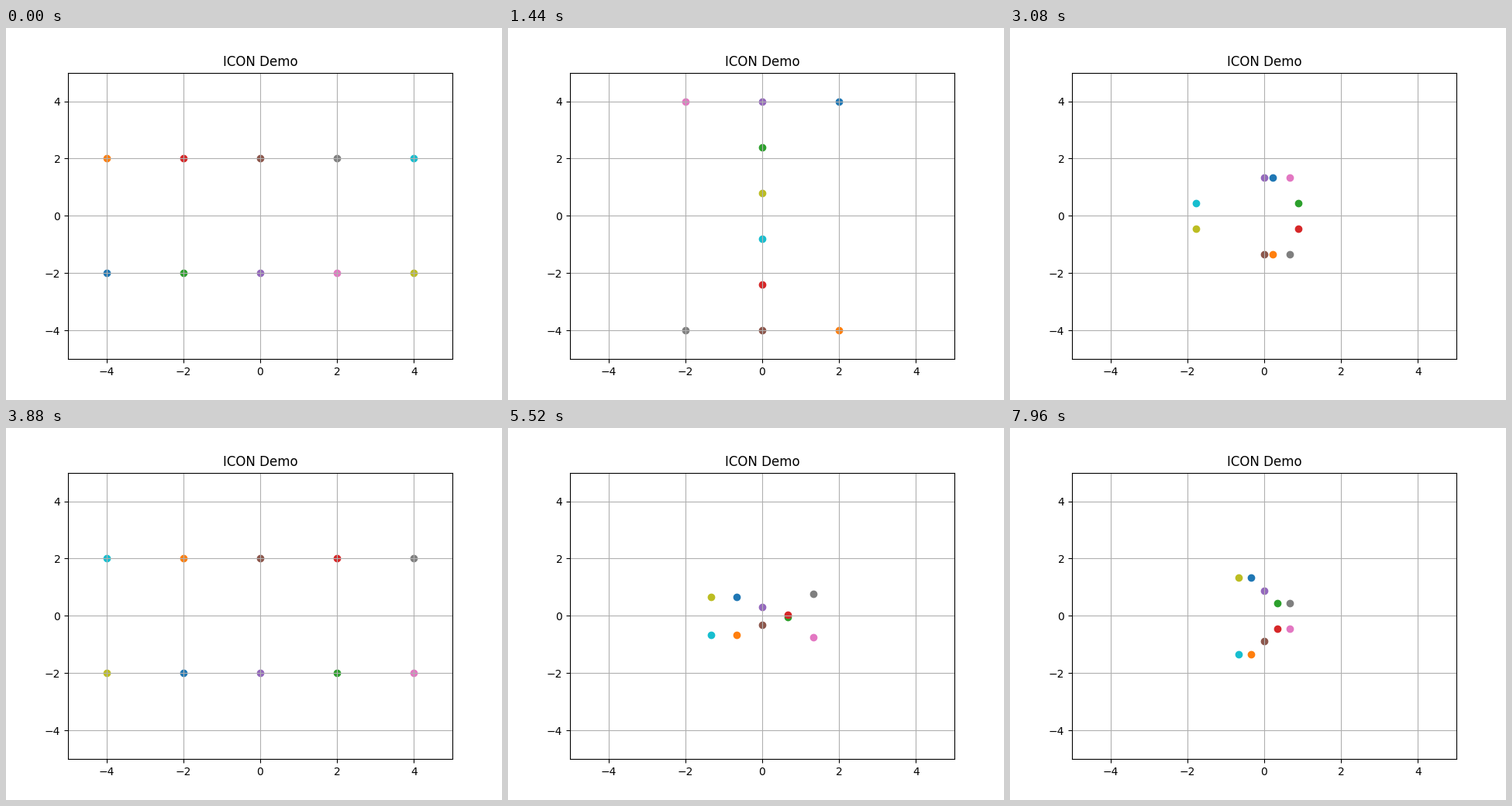
Write a matplotlib script that moves like this. It is 640 px wide and 480 px high and loops after 8 s.

```python
import numpy as np
import matplotlib.pyplot as plt
from matplotlib.animation import FuncAnimation

LOOP, TICK = 8000, 40           # ms
STEP, STEPS, CYCLE = 160, 9, 2440  # ms per step, steps per move, ms per move and hold


def mirrored(xs, ys):
    """Five points, each followed by its mirror image across the x axis."""
    top = np.column_stack([xs, ys])
    return np.stack([top, top * [1, -1]], axis=1).reshape(-1, 2)


rows = mirrored([-4, -2, 0, 2, 4], [-2] * 5)
letter_i = mirrored([2, 0, 0, -2, 0], [4, 2.4, 4, 4, 0.8])
mixed_rows = mirrored([-2, 2, 0, 4, -4], [-2] * 5)
letter_c = mirrored([1, -1, 0, -2, 2], [4, 2.4, 3.2, 0.8, 4])
shapes = [rows, letter_i, mixed_rows, letter_c, mixed_rows]

fig, ax = plt.subplots(figsize=(6.4, 4.8), dpi=100)
ax.set(xlim=(-5, 5), ylim=(-5, 5), title="ICON Demo")
ax.set_xticks(range(-4, 5, 2))
ax.set_yticks(range(-4, 5, 2))
ax.grid(True)
dots = [ax.scatter(x, y, color=f"C{i}") for i, (x, y) in enumerate(rows)]


def positions(t):
    if t < STEP:
        return rows
    move, since = divmod(t - STEP, CYCLE)
    share = min(since // STEP + 1, STEPS) / STEPS
    return shapes[move] + (shapes[move + 1] - shapes[move]) * share


def update(frame):
    for dot, point in zip(dots, positions(frame * TICK)):
        dot.set_offsets([point])
    return dots


anim = FuncAnimation(fig, update, frames=LOOP // TICK, interval=TICK,
                     repeat=True, repeat_delay=0)
plt.show()
```
